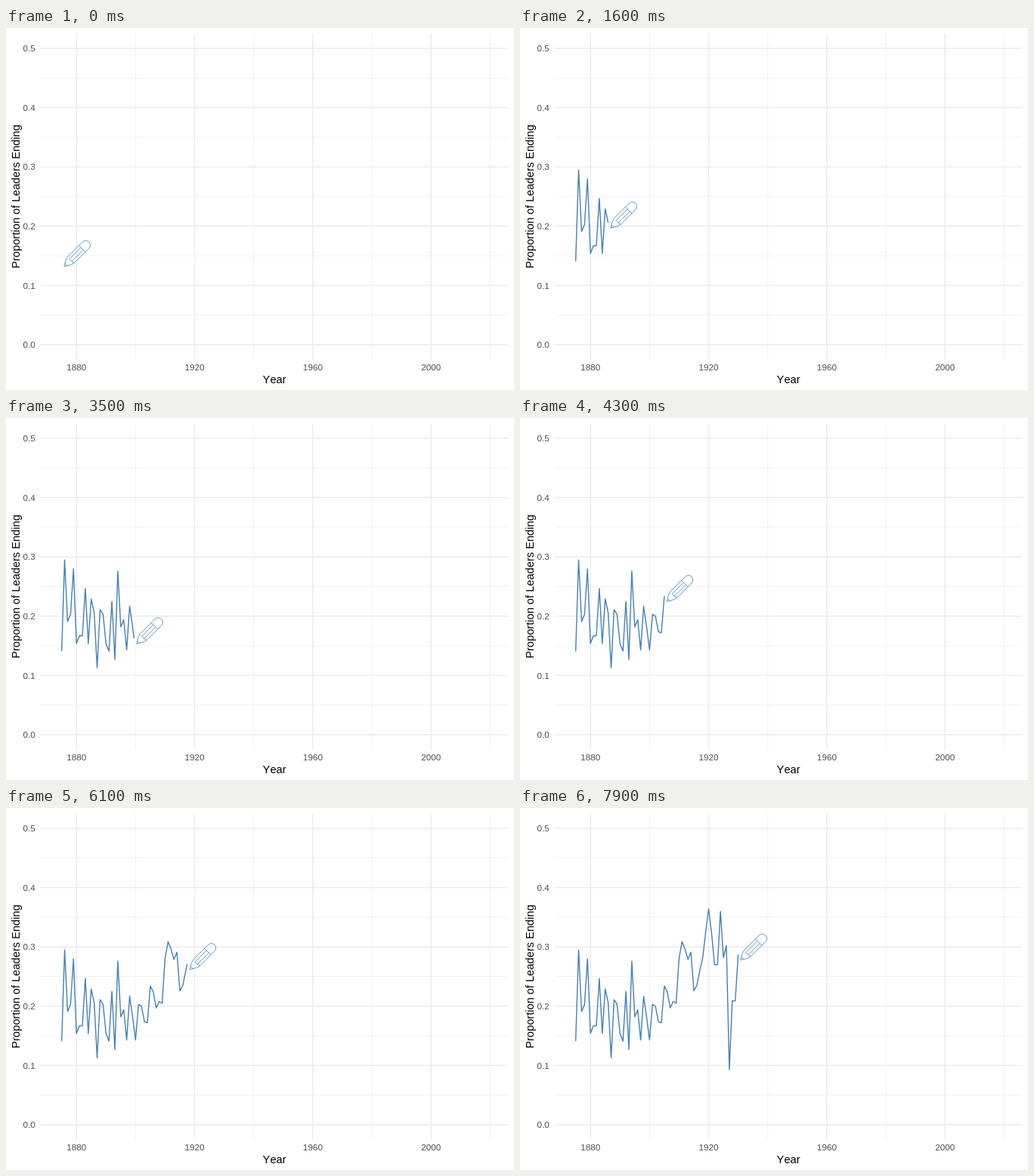
Write an HTML page that moves like this. It is 672 by 480 pixels and loops after 8 s.

```html
<!DOCTYPE html>
<html lang="en">
<head>
<meta charset="utf-8">
<title>Proportion of Leaders Ending</title>
<style>
  html, body { margin: 0; width: 100%; height: 100%; overflow: hidden; background: #fff; }
  svg { display: block; }
  text { font: 11.73px "Liberation Sans", Arial, sans-serif; font-kerning: none; fill: #4d4d4d; }
  .title { font-size: 14.67px; fill: #000; text-anchor: middle; }
  .x { text-anchor: middle; }
  .y { text-anchor: end; }
  path { fill: none; }
  .grid { stroke: #ebebeb; stroke-width: 1.42; }
  .minor { stroke-width: .71; }
  #line { stroke: #4682b4; stroke-width: 1.42; stroke-linejoin: round; }
  #pencil { stroke: #4682b4; stroke-width: .8; }
</style>
</head>
<body>
<svg width="672" height="480" viewBox="0 0 672 480">
  <g id="axes"></g>
  <text class="title" x="355.1" y="471">Year</text>
  <text class="title" transform="translate(17.9 223.5) rotate(-90)">Proportion of Leaders Ending</text>
  <path id="line"/>
  <g id="pencil">
    <path d="M0 0L3.6-2.1Q8.5-5.6 13-6H40.4A6 6 0 0 1 40.4 6H13Q8.5 5.6 3.6 2.1ZM3.6-2.1V2.1"/>
    <path d="M33.5-6V6M33-2.2H12V2.2H33M12 2.2L13 6"/>
  </g>
</svg>
<script>
const FIRST_YEAR = 1875, STEP = 100, STEPS = 80;
const STEPS_PER_YEAR = 199 / 139;
const panel = { left: 45.5, right: 664.67, top: 7.33, bottom: 439.65 };

// Yearly proportions in thousandths
const values = [
  141, 295, 191, 203, 280, 154, 167, 167, 247, 154, 229, 206, 113, 211,
  203, 154, 141, 225, 127, 276, 182, 194, 143, 217, 182, 143, 203, 200,
  174, 172, 234, 224, 197, 208, 205, 281, 309, 296, 279, 291, 226, 235,
  260, 282, 325, 364, 323, 270, 270, 360, 282, 302, 93, 209, 209, 287
];

const xOf = year => panel.left + (year - 1867.8) / 158.4 * (panel.right - panel.left);
const yOf = p => panel.bottom - (p + .025) / .55 * (panel.bottom - panel.top);
const points = values.map((v, i) => [xOf(FIRST_YEAR + i), yOf(v / 1000)]);
const keyStep = i => Math.round(i * STEPS_PER_YEAR);

function drawAxes() {
  let minor = "", major = "", labels = "";
  const vertical = x => `M${x} ${panel.top}V${panel.bottom}`;
  const horizontal = y => `M${panel.left} ${y}H${panel.right}`;
  for (let year = 1880; year < 2020; year += 40) {
    major += vertical(xOf(year));
    minor += vertical(xOf(year + 20));
    labels += `<text class="x" x="${xOf(year)}" y="454.3">${year}</text>`;
  }
  for (let i = 0; i <= 5; i++) {
    const y = yOf(i / 10);
    major += horizontal(y);
    if (i < 5) minor += horizontal(yOf(i / 10 + .05));
    labels += `<text class="y" x="38.9" y="${y + 4.2}">${(i / 10).toFixed(1)}</text>`;
  }
  document.getElementById("axes").innerHTML =
    `<path class="grid minor" d="${minor}"/><path class="grid" d="${major}"/>${labels}`;
}

const line = document.getElementById("line");
const pencil = document.getElementById("pencil");

function draw() {
  const step = Math.floor(performance.now() / STEP) % STEPS;
  let last = 0;
  while (last + 1 < points.length && keyStep(last + 1) <= step) last++;

  // Years fall on whole steps; a step between two years lies on their segment
  const next = Math.min(last + 1, points.length - 1);
  const span = keyStep(next) - keyStep(last) || 1;
  const part = (step - keyStep(last)) / span;
  const tip = points[last].map((c, axis) => c + (points[next][axis] - c) * part);

  const shown = points.slice(0, last + 1);
  if (part > 0) shown.push(tip);
  line.setAttribute("d", step ? "M" + shown.join("L") : "");
  pencil.setAttribute("transform", `translate(${tip[0] + 3.3} ${tip[1] + 7.2}) rotate(-45)`);
  requestAnimationFrame(draw);
}

drawAxes();
draw();
</script>
</body>
</html>
```
